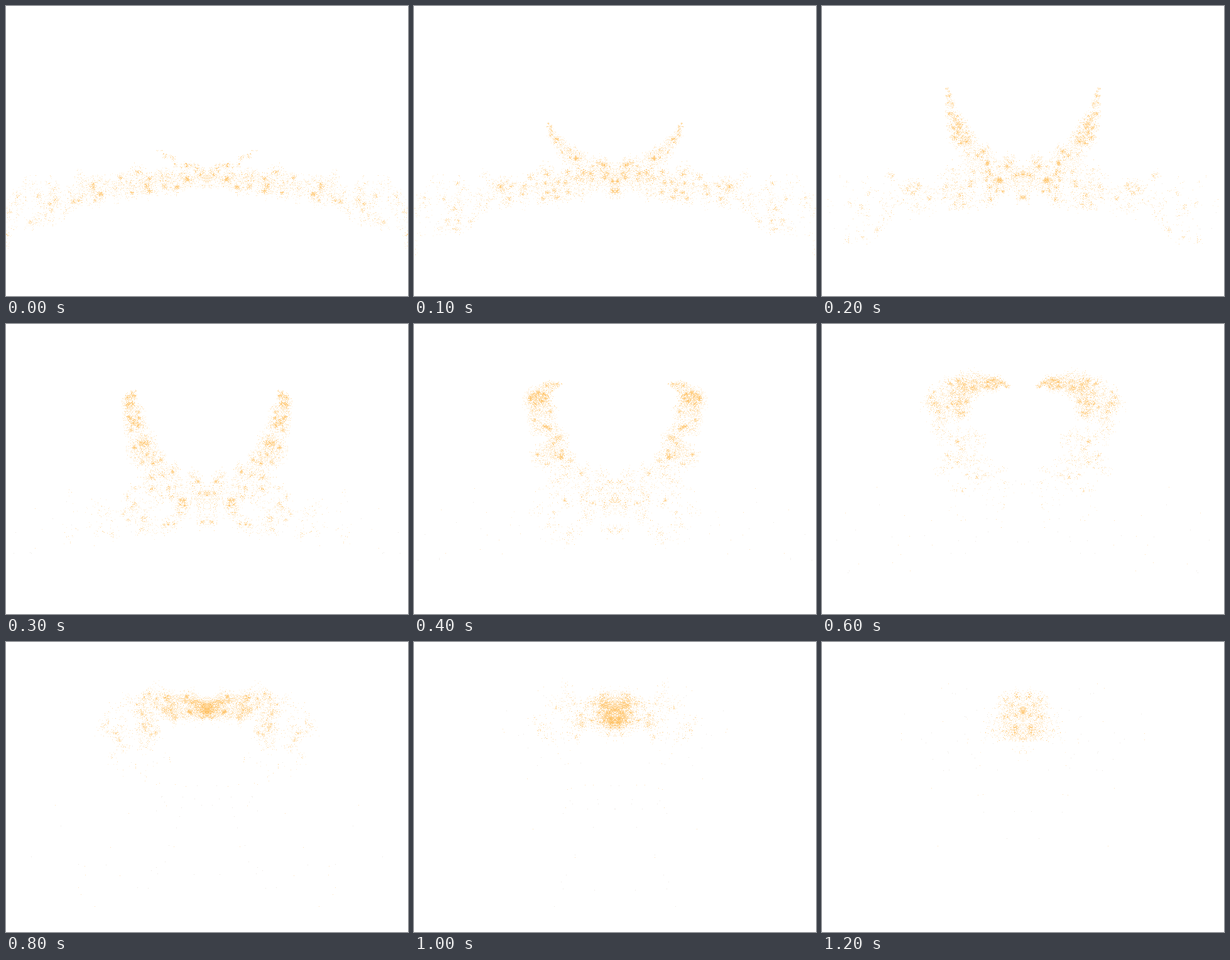
An HTML page with a canvas for the animation above (1.3 s loop, 640 px wide and 461 px high).

```html
<!DOCTYPE html>
<html lang="en">
<head>
<meta charset="utf-8">
<title>Sparkle trails</title>
<style>
html, body { margin: 0; width: 100%; height: 100%; overflow: hidden; background: #fff; }
canvas { display: block; }
</style>
</head>
<body>
<canvas id="stage" width="640" height="461"></canvas>
<script>
const ctx = document.getElementById('stage').getContext('2d');
const LOOP = 1300, STEP = 100, CENTER = 320;
const START = -520, END = 850, LIFE = 0.66;
const STARS = 320, SPECKS = 110;

// Emitter path, one point per 100 ms from -600 ms: offset from centre, height
const PATH = [
  [-415, 350], [-330, 318], [-246, 291], [-165, 279], [-85, 271], [-10, 272],
  [78, 228], [108, 185], [120, 130], [114, 106], [85, 94], [52, 91],
  [22, 99], [0, 105], [0, 109], [0, 113], [0, 116]
];

function random(seed) {
  let s = Math.imul(seed + 1, 0x9E3779B1) | 0;
  return () => {
    s = s + 0x6D2B79F5 | 0;
    let h = Math.imul(s ^ s >>> 15, 1 | s);
    h = h + Math.imul(h ^ h >>> 7, 61 | h) ^ h;
    return ((h ^ h >>> 14) >>> 0) / 4294967296;
  };
}

// Catmull-Rom position of the emitter
function emitter(time) {
  const p = (time + 600) / 100, i = Math.floor(p), f = p - i;
  return [0, 1].map(k => {
    const [a, b, c, d] = [-1, 0, 1, 2].map(n => PATH[Math.max(0, Math.min(PATH.length - 1, i + n))][k]);
    return b + f / 2 * (c - a + f * (2 * a - 5 * b + 4 * c - d + f * (3 * (b - c) + d - a)));
  });
}

// One pixel and its mirror image
function dot(dx, y, color) {
  ctx.fillStyle = color;
  const x = Math.round(dx);
  ctx.fillRect(CENTER + x, Math.round(y), 1, 1);
  ctx.fillRect(CENTER - 1 - x, Math.round(y), 1, 1);
}

function star(i, time) {
  const birth = START + i * (END - START) / STARS;
  const age = (time - birth) / 1000;
  if (age < 0 || age > LIFE) return;

  const rnd = random(i);
  const [x, y] = emitter(birth);
  const angle = rnd() * 2 * Math.PI;
  const spread = 2 + 88 * age * (0.25 + 0.75 * rnd());
  const cx = x + Math.cos(angle) * spread;
  const cy = y + Math.sin(angle) * spread + 20 * age + 40 * age * age;
  const floor = birth > 620 ? 122 + Math.max(0, time - 800) * 0.09 : 461;

  const grow = Math.min(1, 0.1 + age / 0.16);
  const fade = 1 - Math.pow(age / LIFE, 1.8);
  const twinkle = random(i * 31 + time)();
  const bright = grow * fade * (0.4 + 0.8 * twinkle);
  const put = (a, r, color) => {
    const py = cy + Math.sin(a) * r;
    if (py <= floor) dot(cx + Math.cos(a) * r, py, color);
  };

  // soft halo
  for (let n = 48 * bright; n > 0; n--) {
    put(rnd() * 2 * Math.PI, 14 * grow * rnd(), rnd() < 0.3 ? '#ffc26699' : '#ffc26648');
  }
  // eight rays
  if (twinkle < 0.65) return;
  const size = (3 + 3 * rnd()) * grow;
  for (let k = 0; k < 8; k++) {
    for (let r = 1; r < size; r++) {
      if (rnd() < bright * 0.7) put(k * Math.PI / 4, r, '#ffc266b0');
    }
  }
}

// Faint single dots that outlive the trail
function speck(i, time) {
  const birth = START + i * (END - START) / SPECKS;
  const age = (time - birth) / 1000;
  if (age < 0.5 || age > 1.2) return;
  const rnd = random(i + 5000);
  const [x, y] = emitter(birth);
  const angle = rnd() * 2 * Math.PI, speed = 20 + 70 * rnd();
  dot(x + Math.cos(angle) * speed * age,
      y + Math.sin(angle) * speed * age + 20 * age + 20 * age * age,
      rnd() < 0.3 ? '#ffe0b5' : '#ebe6df');
}

let shown = -1;
function draw() {
  const time = Math.floor(performance.now() % LOOP / STEP) * STEP;
  if (time !== shown) {
    shown = time;
    ctx.fillStyle = '#fff';
    ctx.fillRect(0, 0, 640, 461);
    for (let i = 0; i < SPECKS; i++) speck(i, time);
    for (let i = 0; i < STARS; i++) star(i, time);
  }
  requestAnimationFrame(draw);
}
draw();
</script>
</body>
</html>
```
